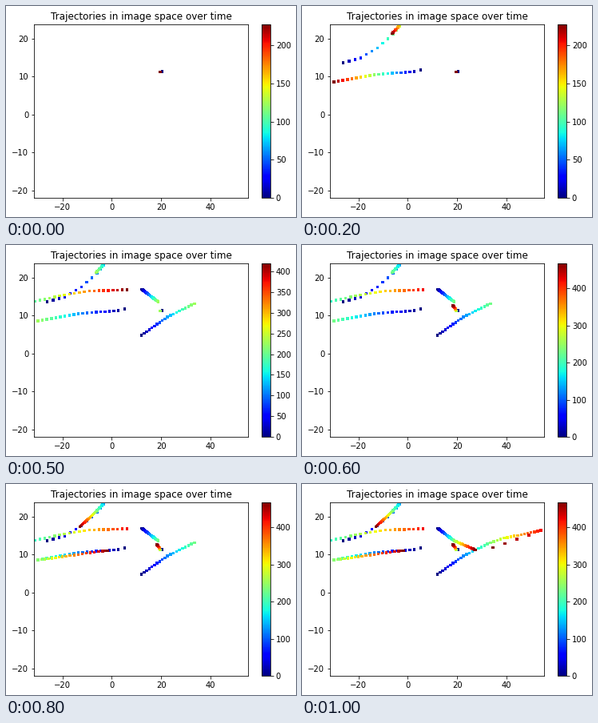
Write a matplotlib script that moves like this. It is 363 px wide and 264 px high and loops after 1100 ms.

```python
import numpy as np
import matplotlib.pyplot as plt
from matplotlib.animation import FuncAnimation

W, H, DPI = 363, 264, 72
STEPS, DT = 20, 12  # samples per track, time units per sample


def track(first, *mid, last, start=0):
    """Rows of x, y, time; mid holds (sample, x, y) key poses."""
    keys = [(0, *first), *mid, (STEPS - 1, *last)]
    k, x, y = np.transpose(keys)
    i = np.arange(STEPS)
    return np.column_stack([np.interp(i, k, x), np.interp(i, k, y), start + DT * i])


def follow(path, *mid, last):
    """Continue a path from its last position."""
    return track(path[-1, :2], *mid, last=last, start=STEPS * DT)


def add_axes(left, width):
    return fig.add_axes([left / W, 23.9 / H, width / W, 217.44 / H])


still = track((20.5, 11.25), (1, 19.6, 11.15), last=(19.6, 11.15))
low = track((5.3, 11.7), (1, 2.7, 11.3), (10, -13.5, 10.45), last=(-29.9, 8.5))
high = track((-26.1, 13.6), (3, -19, 14.9), (6, -12.2, 17.5), (9, -5.9, 21.1),
             (11, -3.4, 23.2), (13, -3.6, 23.1), last=(-6.3, 21.3))
rise = track((12.1, 4.8), (10, 22.6, 9.6), last=(33.5, 13.1))
fall = track((12.1, 16.9), last=(18.8, 13.6))
sweep = track((-31, 13.7), (6, -19.2, 15.4), (11, -9, 16.4),
              last=(6.2, 16.75), start=192)
paths = [
    still, low, high, rise, fall, sweep,
    follow(still, (10, 19.3, 11.8), last=(18.3, 12.6)),
    follow(low, (8, -18.5, 9.5), (17, -3.7, 10.9), last=(-1.7, 11)),
    follow(high, last=(-12.9, 17.3)),
    follow(rise, (4, 39, 14.3), (8, 44.6, 15), (15, 54, 16.3), (16, 49.1, 15.1),
           last=(34.5, 11.8)),
    follow(fall, last=(27.4, 11.2)),
]

plt.rcParams.update({"font.family": "DejaVu Sans", "font.size": 10})
fig = plt.figure(figsize=(W / DPI, H / DPI), dpi=DPI, facecolor="white")
ax = add_axes(35.3, 267.84)
cax = add_axes(319.9, 10.87)
ax.set(xlim=(-31.4, 55.3), ylim=(-21.95, 23.75),
       xticks=range(-20, 41, 20), yticks=range(-20, 21, 10))
ax.set_title("Trajectories in image space over time", fontsize=12)
dots = ax.scatter([], [], c=[], s=12, marker="s", linewidths=0,
                  cmap="jet", vmin=0, vmax=228)
bar = fig.colorbar(dots, cax=cax)


def draw(n):
    pts = np.vstack(paths[:n + 1])
    top = pts[:, 2].max()
    dots.set_offsets(pts[:, :2])
    dots.set_array(pts[:, 2])
    dots.set_clim(0, top)
    bar.set_ticks(np.arange(0, top, 100 if top > 450 else 50))
    return [dots]


anim = FuncAnimation(fig, draw, frames=len(paths), init_func=lambda: draw(0),
                     interval=100, repeat=True, repeat_delay=0, blit=False)
plt.show()
```
